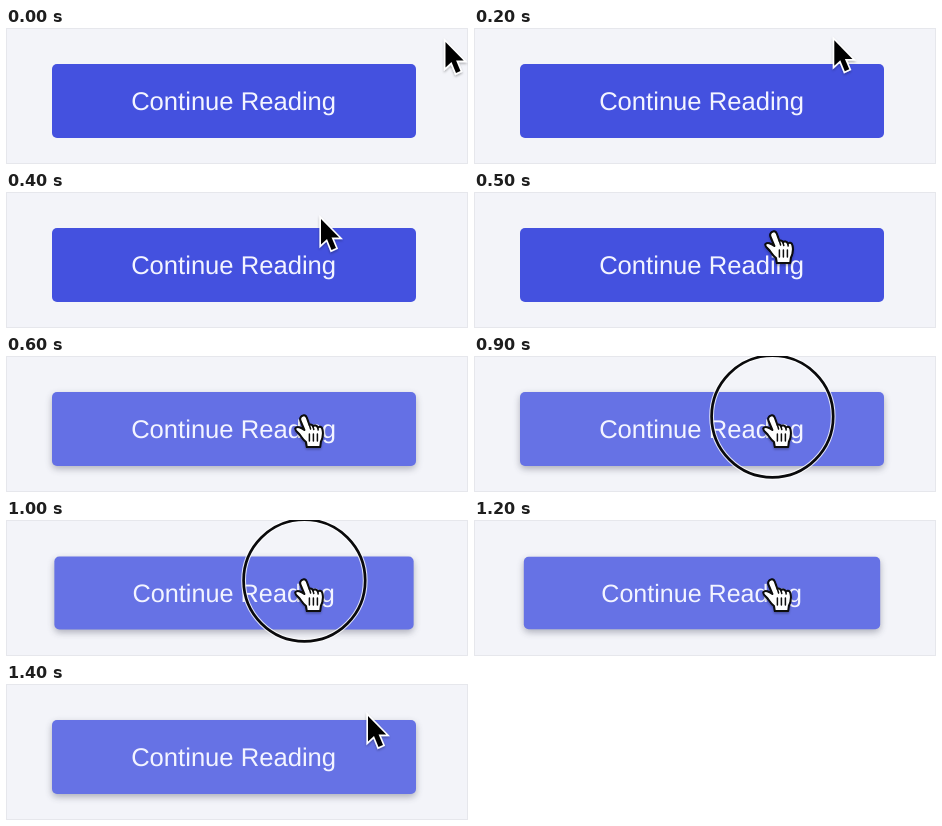
Recreate the animation shown at these times as an HTML page. Size 462 by 136 pixels, loop 1500 ms.

```html
<!DOCTYPE html>
<html lang="en">
<head>
<meta charset="utf-8">
<title>Button click</title>
<style>
  html, body { margin: 0; width: 100%; height: 100%; overflow: hidden; background: #f3f4f9; }
  svg { display: block; width: 462px; height: 136px; }
  text { font: 25.6px "Liberation Sans", Arial, sans-serif; fill: #f3f4ff; text-anchor: middle; text-rendering: geometricPrecision; }
</style>
</head>
<body>
<svg viewBox="0 0 462 136">
  <defs>
    <filter id="blur" x="-10%" y="-30%" width="120%" height="160%">
      <feGaussianBlur stdDeviation="3.8"/>
    </filter>
    <filter id="soft" x="-40%" y="-40%" width="180%" height="180%">
      <feDropShadow dx="0" dy="1.5" stdDeviation="1.2" flood-color="#000" flood-opacity=".3"/>
    </filter>
  </defs>
  <rect width="462" height="136" fill="#f3f4f9"/>
  <rect x=".5" y=".5" width="461" height="135" fill="none" stroke="#e6e7ec"/>
  <g id="button">
    <rect id="shadow" x="46" y="39" width="364" height="74" rx="5" fill="#30344c" filter="url(#blur)"/>
    <rect id="face" x="46" y="36" width="364" height="74" rx="5"/>
    <text x="227.6" y="82">Continue Reading</text>
  </g>
  <g id="ring" fill="none">
    <circle cx="298.4" cy="60.5" r="60.8" stroke="#fff" stroke-opacity=".8" stroke-width="4.8"/>
    <circle cx="298.4" cy="60.5" r="60.8" stroke="#0a0a0c" stroke-width="2.7"/>
  </g>
  <path id="arrow" d="M0 0V25.5L6 20L10.5 31L15 29L10.6 18.6H18.2Z" filter="url(#soft)"
    fill="#050505" stroke="#fff" stroke-width="3.2" paint-order="stroke"/>
  <g id="hand" filter="url(#soft)" stroke="#080808" stroke-width="2" stroke-linecap="round" stroke-linejoin="round">
    <path fill="#fff" d="M1.2-.6C-1.6 0-2.4 2.6-1.4 5L2.4 14C-1 11.3-5 10-6.6 12.2C-7.6 14.2-4.4 16.2-2 19
      C0 21.6 1 23.8 4 26L4.8 31H18.2L18.8 26C20.8 22 21.4 17.5 20.4 13.2C19.8 10.4 16.8 10.2 15.8 11.8
      C15.2 9.2 12 8.8 10.9 10.4C10.2 8.4 8.4 8.2 7.4 9L4.9 2C4.2 0 2.8-.9 1.2-.6Z"/>
    <path fill="none" stroke-width="1.5" d="M7.4 9L8.6 13M10.9 10.4L11.8 13.5M15.8 11.8L16.2 14M7.4 18V25M11.4 18V25M15.4 18V25"/>
  </g>
</svg>
<script>
  const LOOP = 1500, STEP = 100;
  const $ = id => document.getElementById(id);
  const [button, shadow, face, ring, arrow, hand] =
    ["button", "shadow", "face", "ring", "arrow", "hand"].map($);

  // time, values...
  const path = [[0, 439.5, 14], [100, 402, 9], [200, 360.3, 12.3], [400, 315, 27],
    [500, 298, 40], [600, 296, 60], [1200, 296, 60], [1300, 317, 52], [1400, 362, 32]];
  const hover = [[500, 0], [600, 0.94], [700, 1]];
  const press = [[900, 1], [1000, 0.987], [1100, 0.979], [1200, 0.979], [1300, 0.996], [1400, 1]];

  function at(keys, t) {
    const i = keys.findIndex(k => k[0] >= t);
    if (i < 0) return keys[keys.length - 1].slice(1);
    if (i === 0) return keys[0].slice(1);
    const a = keys[i - 1], b = keys[i], p = (t - a[0]) / (b[0] - a[0]);
    return a.slice(1).map((v, n) => v + (b[n + 1] - v) * p);
  }

  const mix = (a, b, p) => `rgb(${a.map((v, i) => Math.round(v + (b[i] - v) * p))})`;
  const show = (el, on) => el.setAttribute("visibility", on ? "visible" : "hidden");

  function draw(now) {
    const t = Math.floor((now % LOOP) / STEP) * STEP;
    const [x, y] = at(path, t), [h] = at(hover, t), [s] = at(press, t);
    const pointing = t >= 500 && t < 1400;

    face.setAttribute("fill", mix([68, 81, 223], [102, 114, 229], h));
    shadow.setAttribute("opacity", 0.36 * h);
    button.setAttribute("transform", `translate(228 73) scale(${s}) translate(-228 -73)`);
    show(ring, t >= 900 && t < 1200);
    show(arrow, !pointing);
    show(hand, pointing);
    (pointing ? hand : arrow).setAttribute("transform", `translate(${x} ${y})`);
  }

  const start = performance.now();
  function tick() {
    draw(performance.now() - start);
    requestAnimationFrame(tick);
  }
  tick();
</script>
</body>
</html>
```
